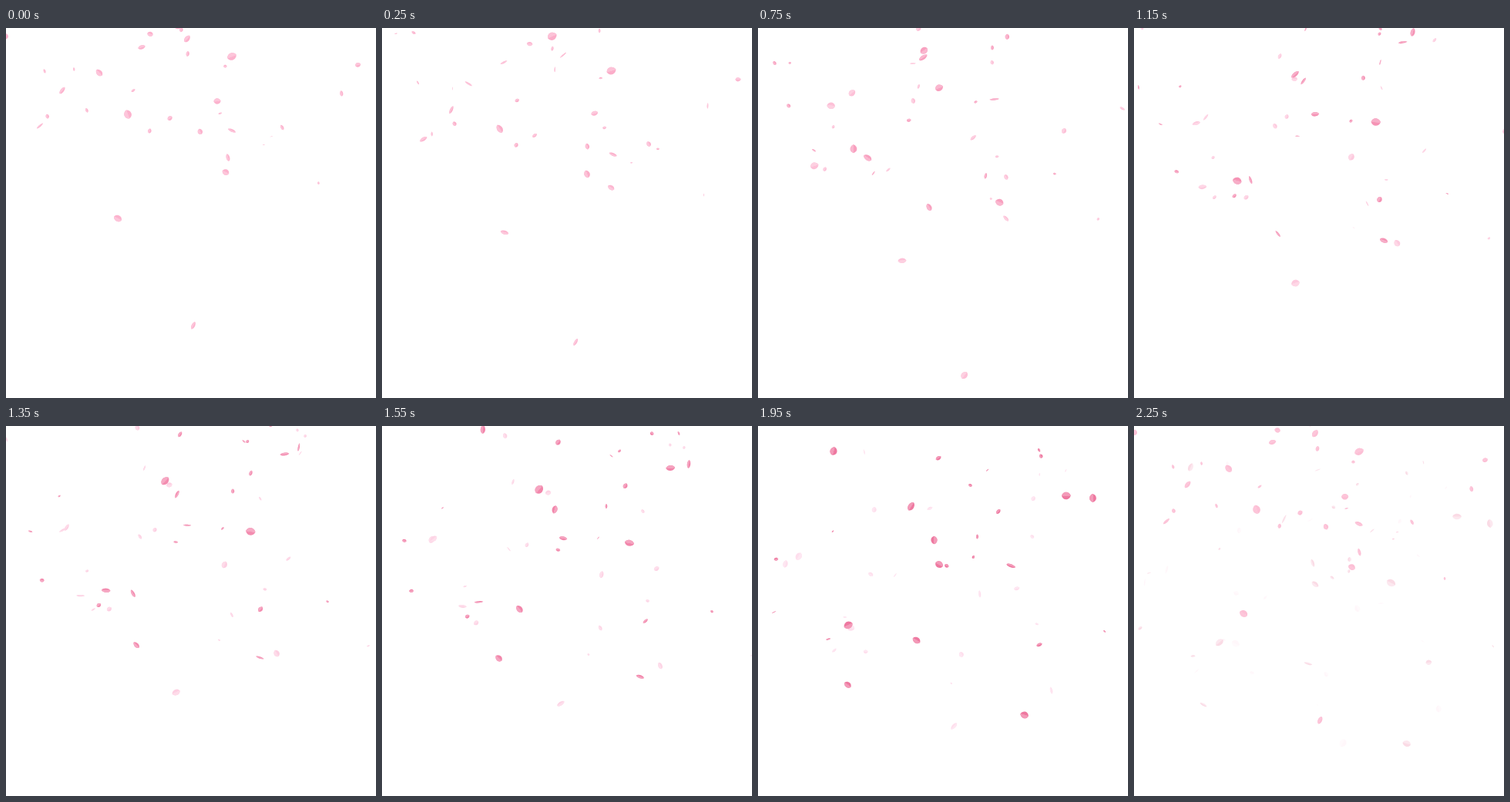
Recreate the animation shown at these times as an HTML page with a canvas. Size 480 by 480 pixels, loop 2300 ms.

```html
<!DOCTYPE html>
<html lang="en">
<head>
<meta charset="utf-8">
<title>Falling petals</title>
<style>
  html, body { margin: 0; width: 100%; height: 100%; overflow: hidden; background: #fff; }
  canvas { display: block; width: 480px; height: 480px; }
</style>
</head>
<body>
<canvas id="stage" width="480" height="480"></canvas>
<script>
const ctx = document.getElementById('stage').getContext('2d');
const LOOP = 2300, STEP = 50, BLEND = 2000, SIZE = 480, SMALL = 40;

// Large petals: place at the start of the loop and speed per second.
const fading = [
  [176, 25, -72, 79], [274, 95, 7, 63], [285, 187, 49, 80], [44, 127, 39, 69],
  [121, 58, -35, 57], [145, 247, 56, 73], [243, 386, 33, 86]
];
const ripening = [
  [288, 168, -88, 86], [293, 133, 27, 124], [73, 81, 68, 101], [158, 112, -21, 75],
  [235, 14, 0, 85], [293, 37, 18, 74], [224, -3, -13, 55], [207, -45, 11, 99],
  [275, -85, 64, 90], [257, -121, 91, 110], [258, -104, -82, 70]
];

const START = [252, 178, 205];
const PALE = [254, 224, 238];
const DEEP = [238, 118, 159];

let seed = 11;
const rand = () => (seed = (seed * 16807) % 2147483647) / 2147483647;
const between = (a, b) => a + (b - a) * rand();
const clamp = v => Math.min(1, Math.max(0, v));
const mix = (a, b, k) => a.map((v, i) => v + (b[i] - v) * k);
const rgb = c => `rgb(${c.map(Math.round).join(',')})`;

function petal([x, y, vx, vy], size, end) {
  return {
    x, y, vx, vy, size, end,
    angle: between(0, Math.PI),
    spin: between(-1, 1),
    flip: between(0, Math.PI),
    turn: between(2, 3.2)
  };
}

// Small petals drift in from the upper part of the stage.
function drifting() {
  const path = [between(0, SIZE), between(-150, 210), between(-60, 60), between(50, 100)];
  return petal(path, between(3, 8), rand() < .5 ? PALE : DEEP);
}

const petals = [
  ...Array.from({ length: SMALL }, drifting),
  ...fading.map(path => petal(path, between(9, 12), PALE)),
  ...ripening.map(path => petal(path, between(10, 12.5), DEEP))
];

function half(len, w) {
  ctx.beginPath();
  ctx.moveTo(-len / 2, 0);
  ctx.bezierCurveTo(-len * .38, w * .6, len * .3, w * .85, len / 2, 0);
  ctx.closePath();
  ctx.fill();
}

function draw(p, t) {
  const open = Math.abs(Math.sin(p.flip + p.turn * t));
  const w = p.size * (.12 + .62 * open);
  const color = mix(START, p.end, clamp(t / 2) ** 1.2);
  ctx.save();
  ctx.translate(p.x + p.vx * t, p.y + p.vy * t);
  ctx.rotate(p.angle + p.spin * t);
  ctx.fillStyle = rgb(color);
  half(p.size, w);
  half(p.size, -w);
  ctx.fillStyle = rgb(mix(color, [255, 255, 255], .25));
  half(p.size, w);
  ctx.restore();
}

function scene(ms, alpha) {
  ctx.globalAlpha = alpha;
  for (const p of petals) draw(p, ms / 1000);
}

// The tail of the loop dissolves into the lead-in of the next one.
function frame(now) {
  const t = Math.floor((now % LOOP) / STEP) * STEP;
  const blend = clamp((t - BLEND) / (LOOP - BLEND));
  ctx.globalAlpha = 1;
  ctx.fillStyle = '#fff';
  ctx.fillRect(0, 0, SIZE, SIZE);
  scene(t, 1 - blend);
  if (blend) scene(t - LOOP, blend);
}

const begin = performance.now();
function tick() {
  frame(performance.now() - begin);
  requestAnimationFrame(tick);
}
tick();
</script>
</body>
</html>
```
